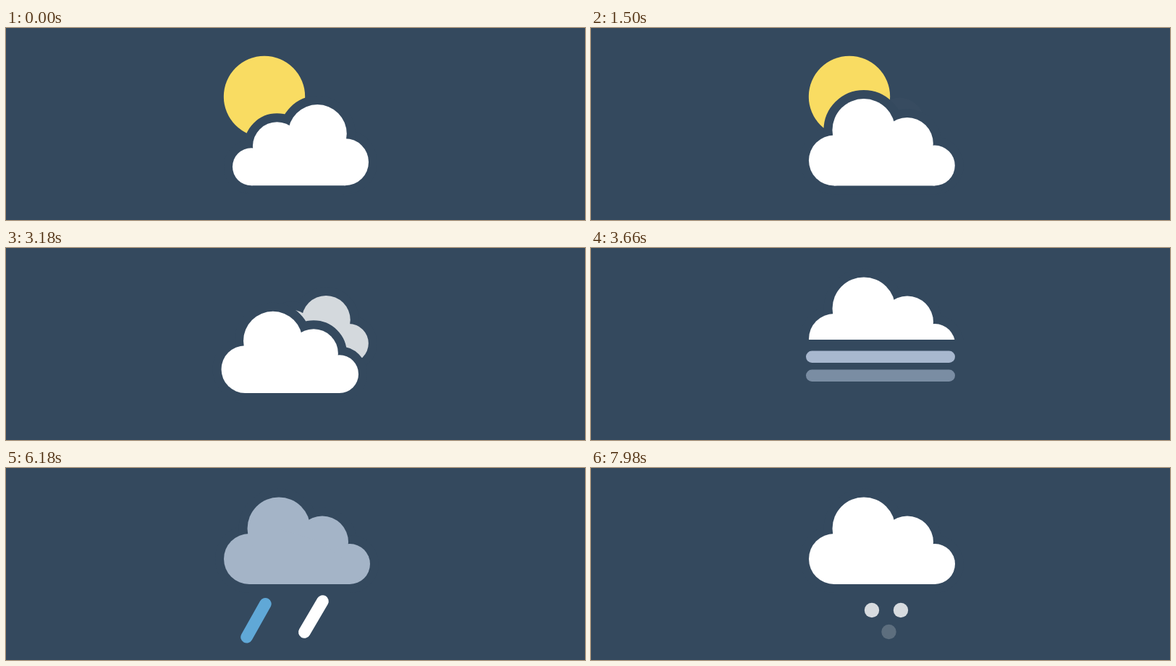
Animation, 800 px wide and 266 px high, one loop 8000 ms. Source, as an HTML page:

```html
<!DOCTYPE html>
<html lang="en">
<head>
<meta charset="utf-8">
<title>Weather</title>
<style>
html, body { margin: 0; width: 100%; height: 100%; overflow: hidden; background: #34495e; }
svg { display: block; width: 100vw; height: 100vh; }
#shape * { vector-effect: non-scaling-stroke; }
.halo { fill: #34495e; stroke: #34495e; stroke-width: 24; stroke-linejoin: round; }
.cloud { fill: #fff; }
.drop { stroke-width: 16.6; stroke-linecap: round; }
</style>
</head>
<body>
<svg viewBox="0 0 800 266">
  <defs>
    <!-- origin: middle of the flat base -->
    <g id="shape">
      <circle cx="-66" cy="-35" r="35"/>
      <circle cx="-25" cy="-77" r="43.5"/>
      <circle cx="35" cy="-58.5" r="36"/>
      <circle cx="73" cy="-28" r="28"/>
      <path d="M-66 0V-35L-25 -77L35 -58.5L73 -28V0Z"/>
    </g>
    <clipPath id="cut"><rect id="cutBox" width="800" height="266"/></clipPath>
  </defs>
  <circle id="sun" r="56.2" fill="#f9dc62"/>
  <g id="first"><use href="#shape" class="halo"/><use href="#shape" class="cloud"/></g>
  <g id="back"><use href="#shape" class="halo"/><use href="#shape" class="cloud"/></g>
  <path id="bolt" fill="#f9dc62" d="M389 173.5H411.5L402 196.5H418L374.5 242L388.5 209H370Z"/>
  <path id="blue" class="drop" stroke="#63aedf" d="M360.5 184.5L334.7 230.5"/>
  <path id="white" class="drop" stroke="#fff" d="M437.5 184.5L412.3 227.5"/>
  <g clip-path="url(#cut)">
    <g id="main"><use href="#shape" class="halo"/><use href="#shape" class="cloud" id="mainFill"/></g>
  </g>
  <g id="fog" fill="#a8b8cf">
    <rect x="297" y="142.5" width="206" height="16.5" rx="8.25"/>
    <rect x="297" y="168.5" width="206" height="16.5" rx="8.25"/>
    <rect x="297" y="194.5" width="206" height="16.5" rx="8.25"/>
  </g>
  <g id="snow" fill="#fff">
    <circle cx="388" cy="197" r="10.2"/>
    <circle cx="428" cy="197" r="10.2"/>
    <circle cx="411.5" cy="227" r="10.2"/>
  </g>
</svg>
<script>
const LOOP = 8000;
const $ = id => document.getElementById(id);

const part = (t, a, b) => Math.min(1, Math.max(0, (t - a) / (b - a)));
const mix = (a, b, k) => a + (b - a) * k;
const easeOut = x => 1 - (1 - x) ** 3;
const backOut = (x, s) => 1 + (s + 1) * (x - 1) ** 3 + s * (x - 1) ** 2;
const backIn = (x, s) => x * x * ((s + 1) * x - s);

function place(id, x, y, scale = 1, opacity = 1, flip = 1) {
  const el = $(id);
  el.setAttribute('transform', `translate(${x} ${y}) scale(${scale * flip} ${scale})`);
  el.setAttribute('opacity', opacity);
  el.style.display = opacity > 0 && scale > 0 ? '' : 'none';
}

// each fall: start of entry, start of exit, exit distance
const FALLS = {
  white: [[5280, 5700, 28], [5970, 6660, 28], [7050, 7440, 0]],
  blue: [[5640, 6120, 26], [6300, 6630, 26], [7080, 7440, 0]]
};

function drop(id, t) {
  let y = 0, opacity = 0;
  for (const [enter, leave, far] of FALLS[id]) {
    if (t < enter) continue;
    const i = part(t, enter, enter + 180), o = part(t, leave, leave + 160);
    y = -14 * (1 - easeOut(i)) + far * o * o;
    opacity = Math.min(i, 1 - o ** 3);
  }
  place(id, -0.565 * y, y, 1, opacity);
}

function mainCloud(t) {
  // middle x, base y, scale
  let x, y = 218.3, s;
  if (t < 1500) {
    const k = backOut(part(t, 700, 1230), 1.9);
    x = mix(326, 402, k);
    s = mix(0.77, 1, k);
  } else {
    const k = easeOut(part(t, 1500, 1830));
    const up = t < 3150 ? 0 : backOut(part(t, 3150, 3630), 2.2);
    x = mix(mix(402, 388, k), 402, up);
    s = mix(mix(1, 0.911, k), 1, up);
    y = mix(218.5, 161, up);
  }
  place('main', x, y, s, part(t, 700, 730));

  const cut = part(t, 3330, 3480) - part(t, 4380, 4500);
  const moving = t < 3330 || t > 4500;
  $('cutBox').setAttribute('height', moving ? 266 : mix(161, 127, cut));

  const grey = part(t, 4400, 4620) - part(t, 6630, 7900);
  const rgb = [164, 180, 199].map(c => Math.round(mix(255, c, grey)));
  $('mainFill').style.fill = `rgb(${rgb})`;
}

function draw(t) {
  const small = part(t, 1500, 1830);
  place('sun', mix(357, 356.3, small), mix(95, 94.5, small), 1 - backIn(part(t, 2280, 2850), 2.6));

  const gone = part(t, 630, 790);
  place('first', 407 - 33 * gone, 218.3, 0.931, 1 - gone, -1);

  const k = easeOut(part(t, 1500, 1800)) - part(t, 3150, 3300);
  place('back', 407 + 20 * k, 190 - 39 * k, 0.772, k, -1);

  mainCloud(t);

  [...$('fog').children].forEach((bar, i) => {
    const start = 3420 + 150 * i;
    bar.setAttribute('opacity', part(t, start, start + 150) * (1 - part(t, 4380, 4530)));
  });

  const enter = part(t, 4530, 4830), leave = part(t, 5130, 5310);
  place('bolt', 0, -75 * (1 - backOut(enter, 2.2)) + 24 * leave * leave, 1, enter > 0 ? 1 - leave : 0);

  drop('white', t);
  drop('blue', t);

  [...$('snow').children].forEach((dot, i) => {
    const start = i < 2 ? 7620 : 7890;
    dot.setAttribute('opacity', part(t, start, start + 450));
  });
}

function tick() {
  draw(performance.now() % LOOP);
  requestAnimationFrame(tick);
}
tick();
</script>
</body>
</html>
```
